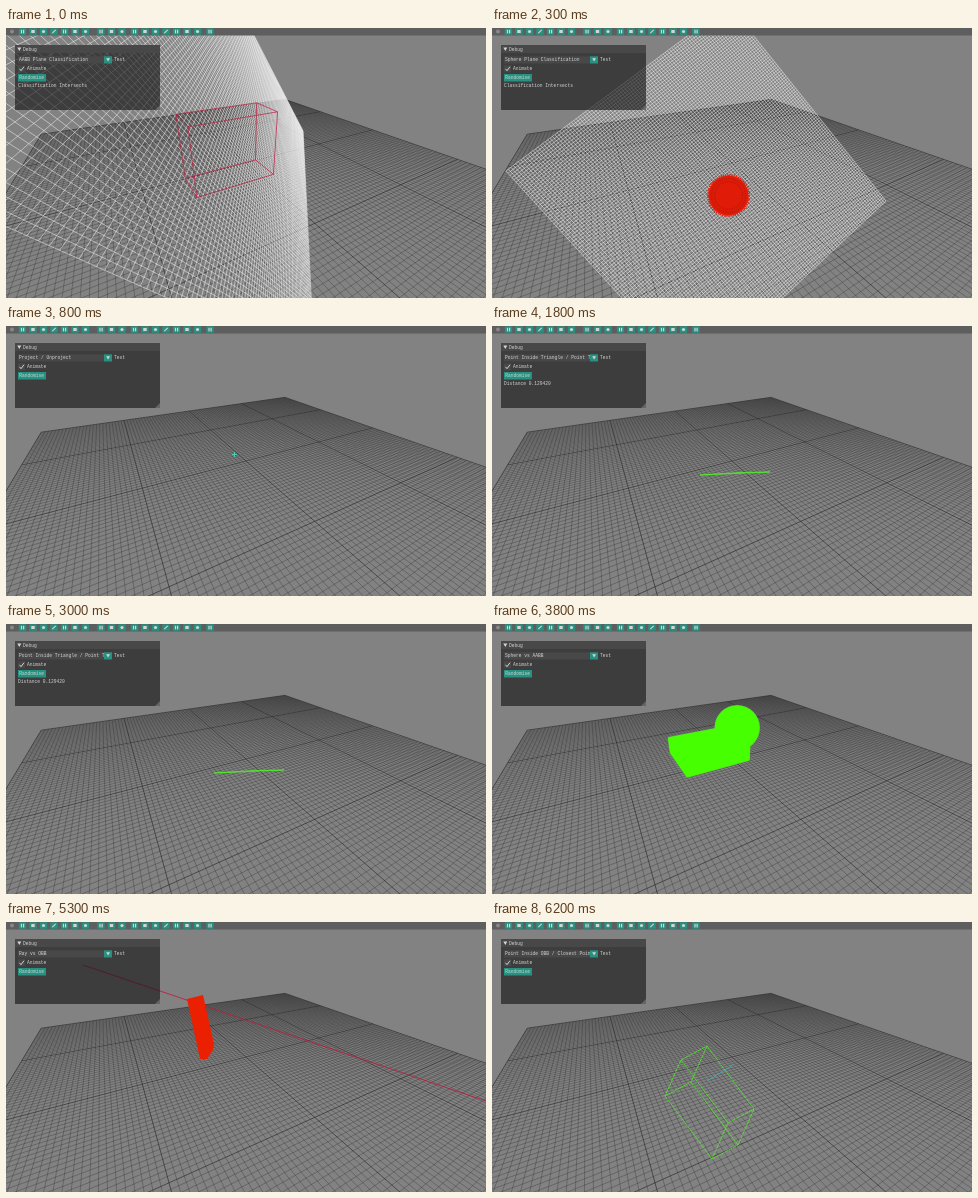
These frames come from a looping animation (480 px wide and 270 px high, 6.3 s). An HTML page with a canvas:

```html
<!DOCTYPE html>
<html lang="en">
<head>
<meta charset="utf-8">
<title>Geometry tests</title>
<style>
  html, body { margin: 0; width: 100%; height: 100%; overflow: hidden; background: #828282; }
  canvas { display: block; width: 480px; height: 270px; }
</style>
</head>
<body>
<canvas id="stage" width="480" height="270"></canvas>
<script>
const ctx = document.getElementById('stage').getContext('2d');
const LOOP = 6300, FOCAL = 233.8, DISTANCE = 60;
const SIN = Math.sin(0.5), COS = Math.cos(0.5); // camera yaw and pitch are both 0.5
const TEAL = '#279281', INK = '#d4d4d4', FIELD = '#484848';
const LIME = '#46ff00', WIRE = '#50f028', CRIMSON = '#c0183c';

// ---- drawing helpers ----
function path(points, close) {
  ctx.beginPath();
  for (const [x, y] of points) ctx.lineTo(x, y);
  if (close) ctx.closePath();
}
function line(points, color, width = 0.8) {
  path(points);
  ctx.strokeStyle = color;
  ctx.lineWidth = width;
  ctx.stroke();
}
function poly(points, color) {
  path(points, true);
  ctx.fillStyle = color;
  ctx.fill();
}
function disc(x, y, r, color) {
  ctx.beginPath();
  ctx.arc(x, y, r, 0, 7);
  ctx.fillStyle = color;
  ctx.fill();
}
function rect(x, y, w, h, color) {
  ctx.fillStyle = color;
  ctx.fillRect(x, y, w, h);
}
function text(s, x, y) {
  ctx.fillStyle = INK;
  ctx.fillText(s, x, y);
}

// ---- camera ----
const toScreen = ([x, y, z]) => [240 + FOCAL * x / z, 135 + FOCAL * y / z];

// World point (y up, ground at 0) to the stage
function world(x, y, z) {
  const ahead = x * SIN + z * COS;
  return toScreen([x * COS - z * SIN, -ahead * SIN - y * COS, DISTANCE + ahead * COS - y * SIN]);
}
// o + u*a + v*b, for vectors of any size
const span = (o, a, b) => (u, v) => o.map((n, i) => n + u * a[i] + v * b[i]);

// at(u, v) gives the stage point for u, v in 0..1
function mesh(at, style) {
  for (let i = 0; i <= 100; i++) {
    const k = i / 100, [color, width] = style(i);
    line([at(k, 0), at(k, 1)], color, width);
    line([at(0, k), at(1, k)], color, width);
  }
}
function plane(o, a, b) {
  const point = span(o, a, b);
  mesh((u, v) => toScreen(point(u, v)), () => ['rgba(255,255,255,.85)', 0.55]);
}

// at(i, j, k) gives the corner of a box for i, j, k in 0, 1
const alignedBox = (lo, hi) => (...side) => world(...side.map((s, i) => s ? hi[i] : lo[i]));
const turned = [(at, c, p, q) => at(c, p, q), (at, c, p, q) => at(q, c, p), (at, c, p, q) => at(p, q, c)];

function wireBox(at, color, width = 0.8) {
  for (const turn of turned)
    for (const p of [0, 1])
      for (const q of [0, 1]) line([turn(at, 0, p, q), turn(at, 1, p, q)], color, width);
}
function solidBox(at, color) {
  for (const turn of turned)
    for (const c of [0, 1])
      poly([turn(at, c, 0, 0), turn(at, c, 1, 0), turn(at, c, 1, 1), turn(at, c, 0, 1)], color);
}

// ---- tests ----
function boxPlane() {
  plane([20.5, -11.5, 84], [-32.6, -41.1, -36.7], [-8.7, 46, -43.7]);
  wireBox(alignedBox([-15.7, 0, -8], [3, 15, 0.3]), 'rgba(192,24,60,.85)');
}
function spherePlane() {
  plane([-3, -158, 233.8], [166.6, 198.4, 14.6], [-198, 165.1, -26]);
  disc(236.5, 167.5, 20, '#e01c08');
  ctx.setLineDash([1.2, 1]);
  for (const r of [14, 17, 20.5]) {
    ctx.beginPath();
    ctx.arc(236.5, 167.5, r, 0, 7);
    ctx.strokeStyle = r > 20 ? '#ee2010' : '#c41808';
    ctx.lineWidth = 1.8;
    ctx.stroke();
  }
  ctx.setLineDash([]);
}
function unproject() {
  line([[226, 128.5], [231, 128.5]], '#50e0c0');
  line([[228.5, 126], [228.5, 131]], '#50e0c0');
}
function triangle() {
  line([[208, 149], [278, 146], [247, 146.6], [208, 149]], WIRE);
}
function sphereBox() {
  const box = alignedBox([-12.9, 0, -2.6], [3.55, 4.4, 11]);
  wireBox(box, '#5ad834', 1.4);
  disc(245.2, 103.8, 22.8, '#5ad834');
  solidBox(box, LIME);
  disc(245.2, 103.8, 22, LIME);
}
function rayBox() {
  line([[77, 43], [480, 179]], CRIMSON);
  poly([[181, 77], [197, 73], [208, 122], [207, 128], [201, 137], [194, 137]], '#ea2000');
}
function pointBox() {
  const face = span([189, 138], [26, -14], [-16, 36]);
  const corner = (i, j, k) => face(i, j).map((n, axis) => n + k * (axis ? 63 : 47));
  ctx.setLineDash([4, 0.7]);
  wireBox(corner, WIRE);
  ctx.setLineDash([]);
  line([[215, 159], [241, 143]], '#38b4c4');
}

const tests = [
  { from: 0, label: 'AABB Plane Classification', draw: boxPlane, result: 'Classification Intersects' },
  { from: 100, label: 'Sphere Plane Classification', draw: spherePlane, result: 'Classification Intersects' },
  { from: 800, label: 'Project / Unproject', draw: unproject },
  { from: 1500, label: 'Point Inside Triangle / Point Triangle', draw: triangle, result: 'Distance 0.129420' },
  { from: 3200, label: 'Sphere vs AABB', draw: sphereBox },
  { from: 4800, label: 'Ray vs OBB', draw: rayBox },
  { from: 6000, label: 'Point Inside OBB / Closest Point on OBB', draw: pointBox }
];

// ---- scenery and interface ----
function ground() {
  mesh((u, v) => world(u * 100 - 50, 0, v * 100 - 50),
    i => i % 25 ? ['rgba(36,36,36,.75)', 0.4] : ['rgba(32,32,32,.9)', 0.65]);
}

const glyphs = [
  x => { rect(x - 1.6, 1.8, 1.2, 3.6, INK); rect(x + 0.5, 1.8, 1.2, 3.6, INK); },
  x => rect(x - 1.7, 2, 3.4, 3, INK),
  x => disc(x, 3.5, 1.6, INK),
  x => line([[x - 1.7, 5.2], [x + 1.7, 1.8]], INK, 1.1)
];
function buttons(x, count) {
  for (let i = 0; i < count; i++, x += 10.5) {
    rect(x - 3.7, 0.3, 7.4, 6.4, TEAL);
    glyphs[i % glyphs.length](x);
  }
}
function toolbar() {
  rect(0, 0, 480, 7.5, '#5e5e5e');
  disc(6, 3.5, 2, '#888');
  buttons(16.5, 7);
  buttons(95, 3);
  buttons(128.5, 7);
  buttons(204, 1);
}

function panel(label, result = '') {
  rect(9, 17, 145, 65, 'rgba(15,15,15,.6)');
  rect(9, 17, 145, 8, FIELD);
  poly([[11.3, 19.6], [15.3, 19.6], [13.3, 23]], INK);
  text('Debug', 17, 22.9);

  rect(12, 28.3, 86, 7.2, FIELD);
  rect(98, 28.3, 8, 7.2, TEAL);
  poly([[100.2, 30.3], [104, 30.3], [102.1, 33.5]], INK);
  ctx.save();
  ctx.beginPath();
  ctx.rect(12, 28, 86, 8);
  ctx.clip();
  text(label, 13, 33.4);
  ctx.restore();
  text('Test', 108, 33.4);

  rect(12, 37.3, 7, 7, FIELD);
  line([[13.5, 40.8], [15, 42.7], [18, 38.7]], INK, 1);
  text('Animate', 21, 42.4);

  rect(12, 46, 28, 7.5, TEAL);
  text('Randomise', 13.3, 51.2);
  text(result, 12, 59.4);
  poly([[154, 77], [154, 82], [149, 82]], 'rgba(150,150,150,.45)');
}

const start = performance.now();
function frame() {
  const t = (performance.now() - start) % LOOP;
  const test = tests.findLast(({ from }) => from <= t);
  ctx.font = '4.6px "Liberation Mono", monospace';
  rect(0, 0, 480, 270, '#828282');
  ground();
  test.draw();
  toolbar();
  panel(test.label, test.result);
  requestAnimationFrame(frame);
}
frame();
</script>
</body>
</html>
```
